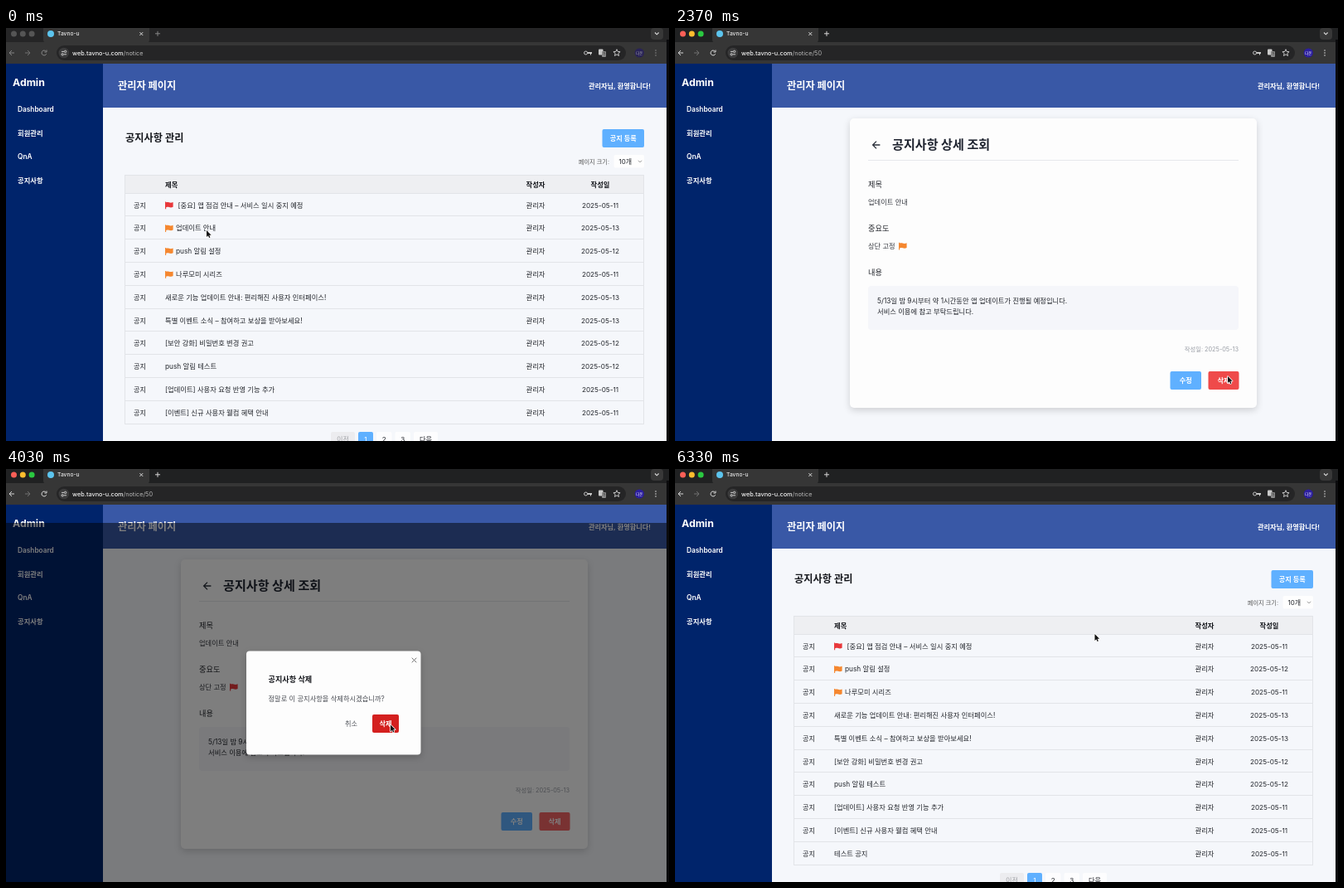
These frames come from a looping animation (800x498 px, 6360 ms). An HTML page with a canvas:

```html
<!DOCTYPE html>
<html lang="ko">
<head>
<meta charset="utf-8">
<title>Admin</title>
<style>
html, body { margin: 0; width: 100%; height: 100%; overflow: hidden; background: #f5f7fb; }
canvas { display: block; width: 800px; height: 498px; }
</style>
</head>
<body>
<canvas id="stage" width="800" height="498"></canvas>
<script>
const ctx = document.getElementById('stage').getContext('2d');
const FONT = 'Inter, "Noto Sans CJK KR", "Noto Sans CJK", sans-serif';
const LOOP = 6360;
const BLUE = '#5fb0ff', ORANGE = '#f5872f', RED = '#e8383b', INK = '#23262c';

// Event times in ms
const FOCUS = 300, OPEN = 900, ASK = 2680, CLOSE = 4250, TOAST = 4320, BACK = 5600;

const POSTS = [
  ['[중요] 앱 점검 안내 – 서비스 일시 중지 예정', 11, RED],
  ['업데이트 안내', 13, ORANGE],
  ['push 알림 설정', 12, ORANGE],
  ['나루모미 시리즈', 11, ORANGE],
  ['새로운 기능 업데이트 안내: 편리해진 사용자 인터페이스!', 13],
  ['특별 이벤트 소식 – 참여하고 보상을 받아보세요!', 13],
  ['[보안 강화] 비밀번호 변경 권고', 12],
  ['push 알림 테스트', 12],
  ['[업데이트] 사용자 요청 반영 기능 추가', 11],
  ['[이벤트] 신규 사용자 웰컴 혜택 안내', 11],
  ['테스트 공지', 11]
];

// Cursor keys: time, x, y
const PATH = [
  [0, 242, 244], [1340, 242, 244], [1920, 667, 420],
  [3290, 667, 420], [3860, 464, 308.5],
  [5750, 464, 308.5], [6260, 506.5, 199]
];

function rect(x, y, w, h, color, r = 0) {
  ctx.fillStyle = color;
  ctx.beginPath();
  ctx.roundRect(x, y, w, h, r);
  ctx.fill();
}

function circle(x, y, r, color) {
  ctx.fillStyle = color;
  ctx.beginPath();
  ctx.arc(x, y, r, 0, Math.PI * 2);
  ctx.fill();
}

function line(color, width, ...strokes) {
  ctx.strokeStyle = color;
  ctx.lineWidth = width;
  ctx.beginPath();
  for (const p of strokes) {
    ctx.moveTo(p[0], p[1]);
    for (let i = 2; i < p.length; i += 2) ctx.lineTo(p[i], p[i + 1]);
  }
  ctx.stroke();
}

// y is the optical middle of the line
function text(str, x, y, size = 8.3, color = INK, weight = 400, align = 'left') {
  ctx.font = `${weight} ${size}px ${FONT}`;
  ctx.textAlign = align;
  ctx.fillStyle = color;
  ctx.fillText(str, x, y + size * 0.36);
  return ctx.measureText(str).width;
}

function button(label, x, y, w, h, color, ink = '#fff', weight = 600) {
  rect(x, y, w, h, color, 2);
  text(label, x + w / 2, y + h / 2 + 0.3, 8.2, ink, weight, 'center');
}

function shadowed(blur, dy, alpha, draw) {
  ctx.save();
  ctx.shadowColor = `rgba(0,0,0,${alpha})`;
  ctx.shadowBlur = blur;
  ctx.shadowOffsetY = dy;
  draw();
  ctx.restore();
}

function cross(x, y, r, color, width = 1) {
  line(color, width, [x - r, y - r, x + r, y + r], [x - r, y + r, x + r, y - r]);
}

function arrow(x, y, r, dir, color, width) {
  line(color, width, [x - r, y, x + r, y],
    [x, y - r, x + r * dir, y, x, y + r]);
}

function flag(x, y, color) {
  line(color, 1.1, [x + 0.6, y - 4.2, x + 0.6, y + 4.6]);
  ctx.fillStyle = color;
  ctx.beginPath();
  ctx.moveTo(x + 0.6, y - 3.2);
  ctx.bezierCurveTo(x + 4, y - 4.8, x + 5.5, y - 1.8, x + 9.6, y - 3.7);
  ctx.lineTo(x + 9.6, y + 2);
  ctx.bezierCurveTo(x + 5.8, y + 4, x + 4, y + 0.8, x + 0.6, y + 2.6);
  ctx.fill();
}

function star(x, y, r, color) {
  const p = [];
  for (let i = 0; i <= 10; i++) {
    const a = i * Math.PI / 5 - Math.PI / 2, d = i % 2 ? r * 0.45 : r;
    p.push(x + d * Math.cos(a), y + d * Math.sin(a));
  }
  line(color, 0.9, p);
}

function chrome(focused, url) {
  const ink = focused ? '#d5d5d5' : '#858585';
  rect(0, 0, 800, 18, focused ? '#202122' : '#252526');
  rect(45, -5, 128, 24, '#363636', 5);
  rect(0, 17, 800, 26, '#363636');
  const lights = focused ? ['#fb5f57', '#fdbc2e', '#2ac840'] : ['#555', '#555', '#555'];
  lights.forEach((c, i) => circle(9.5 + i * 10.8, 7, 3.5, c));
  circle(54, 7, 4, '#5cc4ee');
  text('Tavno-u', 62, 7, 6.7, '#e8e8e8', 500);
  cross(163.3, 7, 2, '#ddd', 0.9);
  line(ink, 1, [180, 6.8, 186, 6.8], [183, 3.8, 183, 9.8]);
  rect(778, 0, 15, 14, '#383838', 4);
  line('#ddd', 1.1, [783, 5.5, 785.3, 7.8, 787.6, 5.5]);

  arrow(7, 30, 3, -1, ink, 1);
  arrow(26, 30, 3, 1, '#707070', 1);
  ctx.strokeStyle = ink;
  ctx.lineWidth = 1;
  ctx.beginPath();
  ctx.arc(46, 30, 3, 0.4, 5.6);
  ctx.stroke();
  line(ink, 1, [49, 26.5, 49, 29, 46.5, 29]);

  rect(61, 21, 687, 18, '#252526', 9);
  circle(69.8, 30, 6.3, '#3b3b3c');
  line('#ddd', 0.9, [67, 28.4, 70, 28.4], [70, 31.8, 73, 31.8]);
  ctx.strokeStyle = '#ddd';
  for (const [x, y] of [[71.6, 28.4], [68.2, 31.8]]) {
    ctx.beginPath();
    ctx.arc(x, y, 1.2, 0, 7);
    ctx.stroke();
  }
  const w = text('web.tavno-u.com', 80, 30, 7.3, '#f0f0f0', 500);
  text(url, 80 + w, 30, 7.3, '#b4b4b4');

  ctx.strokeStyle = '#d5d5d5';
  ctx.beginPath();
  ctx.arc(699.6, 30, 2, 0, 7);
  ctx.stroke();
  line('#d5d5d5', 1.8, [702, 30, 707, 30]);
  line('#d5d5d5', 1, [705.5, 30, 705.5, 32.5]);
  rect(715, 25.5, 5.5, 7, '#c9c9c9', 1);
  rect(719, 28, 5, 7, '#8b8b8b', 1);
  text('가', 721.5, 31.5, 4, '#222', 500, 'center');
  star(737, 30, 4.3, '#d5d5d5');
  circle(764.3, 30, 5.6, focused ? '#2c1f9e' : '#292357');
  text('다온', 764.3, 30, 4.3, focused ? '#fff' : '#aaa', 500, 'center');
  for (const y of [27, 30, 33]) circle(784, y, 0.8, ink);
}

function frame() {
  rect(0, 43, 800, 455, '#f5f7fb');
  rect(117, 43, 683, 53, '#3958a6');
  rect(0, 43, 117, 455, '#00246b');
  text('Admin', 8, 65.5, 12.3, '#fff', 700);
  ['Dashboard', '회원관리', 'QnA', '공지사항'].forEach((s, i) =>
    text(s, 14, 98.5 + i * 28.4, 8.3, '#fff', 600));
  text('관리자 페이지', 135, 70, 12.2, '#fff', 700);
  text('관리자님, 환영합니다!', 778, 70, 8.2, '#fff', 600, 'right');
}

function list(posts) {
  text('공지사항 관리', 144, 133, 12.2, '#15171c', 600);
  button('공지 등록', 719.5, 122, 50.5, 22, BLUE);
  text('페이지 크기:', 728, 161, 7.2, '#555', 400, 'right');
  rect(733.5, 153, 36.5, 15.5, '#fefefe', 2);
  text('10개', 739.5, 161, 8);
  line('#777', 0.8, [763, 159.8, 765, 161.8, 767, 159.8]);

  rect(144, 178, 626, 21.5, '#eeeff2');
  text('제목', 192, 188.7, 8.3, '#15171c', 600);
  text('작성자', 639, 188.7, 8.3, '#15171c', 600, 'center');
  text('작성일', 717, 188.7, 8.3, '#15171c', 600, 'center');
  posts.forEach(([title, day, mark], i) => {
    const top = 199.5 + i * 27.8, y = top + 14.2;
    line('#e2e4e8', 1, [144, Math.round(top) - 0.5, 770, Math.round(top) - 0.5]);
    text('공지', 154, y, 8.2);
    if (mark) flag(192, y, mark);
    text(title, mark ? (mark === RED ? 207.5 : 205) : 192, y);
    text('관리자', 639, y, 8.3, INK, 400, 'center');
    text('2025-05-' + day, 717, y, 8.2, INK, 400, 'center');
  });
  ctx.strokeStyle = '#e2e4e8';
  ctx.strokeRect(143.5, 177.5, 626, 300);

  button('이전', 392, 487, 29, 17, '#ececef', '#a5a7ab', 400);
  button('1', 425, 487, 18, 17, BLUE, '#fff', 400);
  button('2', 447, 487, 18.5, 17, '#fdfdfe', INK, 400);
  button('3', 469.5, 487, 18.5, 17, '#fdfdfe', INK, 400);
  button('다음', 492, 487, 29, 17, '#fdfdfe', INK, 400);
}

function detail(mark, hover) {
  shadowed(9, 3, 0.16, () => rect(211, 109, 491, 349, '#fdfdfd', 5));
  arrow(243, 141, 4.4, -1, '#2b303b', 1.3);
  // trims the arrow head onto the left end of the shaft
  text('공지사항 상세 조회', 262, 140.7, 15.1, '#1f2430', 700);
  line('#e6e8ec', 1, [233, 159.5, 680, 159.5]);
  text('제목', 233, 189, 9.2, INK, 500);
  text('업데이트 안내', 233, 210.5, 8.25, '#3a3d44');
  text('중요도', 233, 242, 9.2, INK, 500);
  text('상단 고정', 233, 263, 8.25, '#3a3d44');
  flag(270, 263, mark);
  text('내용', 233, 294.5, 9.2, INK, 500);
  rect(233, 311, 447, 53, '#f5f6fa', 4);
  text('5/13일 밤 9시부터 약 1시간동안 앱 업데이트가 진행될 예정입니다.', 244, 329, 8.3);
  text('서비스 이용에 참고 부탁드립니다.', 244, 342, 8.3);
  text('작성일: 2025-05-13', 680, 387, 7.3, '#9a9ea6', 400, 'right');
  button('수정', 597.5, 414, 37.5, 22, BLUE);
  button('삭제', 643.5, 414, 37, 22, hover ? '#ef4a4a' : '#f46465');
}

function dialog(hover) {
  rect(0, 65, 797, 433, 'rgba(0,0,0,0.5)');
  shadowed(8, 3, 0.2, () => rect(290, 219.5, 210.5, 125, '#fdfdfd', 4));
  cross(492.5, 230.5, 2.8, '#666', 0.9);
  text('공지사항 삭제', 316.5, 253.5, 9.15, '#15171c', 600);
  text('정말로 이 공지사항을 삭제하시겠습니까?', 316.5, 276.8, 8.25, '#4a4d54');
  text('취소', 416.5, 307.3, 8.2, '#55585f', 400, 'center');
  button('삭제', 442, 296, 32, 22, hover ? '#d4201f' : '#ef3a3b');
}

function toast(t) {
  const y = 98 - ease((t - 4480) / 100);
  ctx.globalAlpha = ease((t - TOAST) / 100);
  shadowed(6, 2, 0.18, () => rect(661, y, 124, 22, '#3dd672', 2));
  text('공지사항이 삭제되었습니다.', 669.5, y + 11.3, 8.2, '#fff', 500);
  cross(773, y + 11.2, 2.6, '#fff', 1);
  ctx.globalAlpha = 1;
}

function ease(k) {
  k = Math.min(1, Math.max(0, k));
  return k * k * (3 - 2 * k);
}

function position(t) {
  let i = 0;
  while (i < PATH.length - 1 && PATH[i + 1][0] <= t) i++;
  const a = PATH[i], b = PATH[i + 1] || a;
  const k = ease((t - a[0]) / (b[0] - a[0] || 1));
  return [a[1] + (b[1] - a[1]) * k, a[2] + (b[2] - a[2]) * k];
}

function pointer(x, y, beam) {
  if (beam) {
    line('#555', 0.9, [x, y - 3.5, x, y + 3.5],
      [x - 1.6, y - 4.2, x, y - 3.5, x + 1.6, y - 4.2],
      [x - 1.6, y + 4.2, x, y + 3.5, x + 1.6, y + 4.2]);
    return;
  }
  ctx.save();
  ctx.translate(x, y);
  const shape = new Path2D('M0 0V8L1.9 6.3L3.1 9L4.4 8.4L3.2 5.8H5.7Z');
  ctx.strokeStyle = '#fff';
  ctx.lineWidth = 1.5;
  ctx.lineJoin = 'round';
  ctx.stroke(shape);
  ctx.fillStyle = '#111';
  ctx.fill(shape);
  ctx.restore();
}

function draw(t) {
  const open = t >= OPEN && t < BACK;
  const asking = t >= ASK && t < CLOSE;
  const [x, y] = position(t);
  frame();
  if (open) detail(asking ? RED : ORANGE, !asking && x > 643 && y > 414);
  else list(t < OPEN ? POSTS.slice(0, 10) : POSTS.filter((p, i) => i !== 1));
  if (asking) dialog(x > 442 && x < 474 && y < 318);
  if (t >= TOAST && t < BACK) toast(t);
  chrome(t >= FOCUS, open ? '/notice/50' : '/notice');
  rect(797, 14, 3, 484, '#0b0b0d');
  pointer(x, y, open && t < 1360);
}

function tick() {
  draw(performance.now() % LOOP);
  requestAnimationFrame(tick);
}
tick();
</script>
</body>
</html>
```
